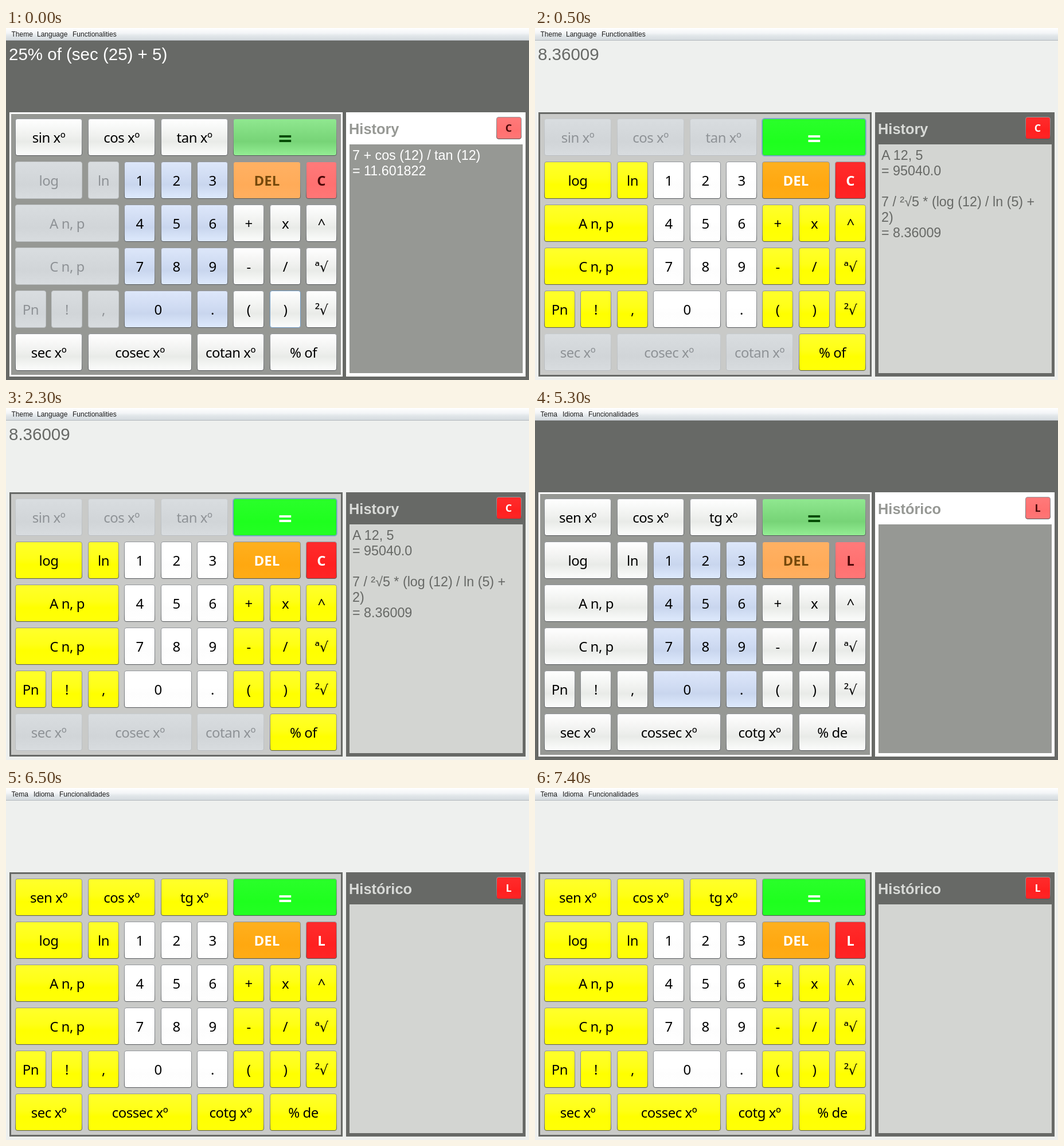
Write an HTML page that moves like this. It is 912x614 px and loops after 8000 ms.

```html
<!DOCTYPE html>
<html lang="en">
<head>
<meta charset="utf-8">
<title>Scientific calculator</title>
<style>
  html, body { margin: 0; width: 100%; height: 100%; overflow: hidden; }
  svg { position: absolute; left: 0; top: 0; width: 912px; height: 614px; display: block; }
  text { white-space: pre; }
  .menu { font: 12px "Liberation Sans", Arial, sans-serif; fill: #1c1c1c; }
  .display { font: 29.5px "Liberation Sans", Arial, sans-serif; }
  .log { font: 23.3px "Liberation Sans", Arial, sans-serif; }
  .title { font: bold 25.4px "Liberation Sans", Arial, sans-serif; }
  .key { font: 24px "Noto Sans", "DejaVu Sans", sans-serif; letter-spacing: -.5px; text-anchor: middle; }
  .bold { font-weight: bold; letter-spacing: 0; }
  .small { font-size: 18px; }
  .equals { font: bold 33px "DejaVu Sans", sans-serif; }

  /* Scenes are stacked, earliest on top; each one drops out when its time is over. */
  .scene { animation: 8s step-end infinite; }
  .s0 { animation-name: first; }
  .s1 { animation-name: second; }
  .s2 { animation-name: third; }
  @keyframes first { 0% { visibility: visible; } 6.25% { visibility: hidden; } }
  @keyframes second { 0% { visibility: visible; } 43.75% { visibility: hidden; } }
  @keyframes third { 0% { visibility: visible; } 81.25% { visibility: hidden; } }
</style>
</head>
<body>
<svg id="stage" viewBox="0 0 912 614" xmlns="http://www.w3.org/2000/svg"></svg>
<script>
const themes = {
  dark: {
    bg: '#676966', frame: '#ffffff', panel: '#969894', list: '#969894',
    ink: '#ffffff', title: '#969894', logInk: '#ffffff',
    fills: {
      op: ['#ffffff', '#f0f1ef', '#e9ebe8', '#fcfdfc'],
      num: ['#dde7fa', '#cfdbf2', '#c9d6ee', '#deeafd'],
      eq: ['#90e890', '#7dd97d', '#77d477', '#94ee94'],
      del: ['#ffb163', '#ffad5c', '#ffab58', '#ffaf60'],
      clear: ['#ff7a7a', '#ff7373', '#ff7070', '#ff7777']
    },
    labels: { op: '#000', num: '#000', eq: '#044a04', del: '#75490c', clear: '#4c0808' }
  },
  light: {
    bg: '#eef0ee', frame: '#676966', panel: '#c9cac8', list: '#d3d5d2',
    ink: '#676966', title: '#d8dad7', logInk: '#676966',
    fills: {
      op: ['#ffff2c', '#ffff16', '#ffff00', '#ffff08'],
      num: ['#ffffff', '#ffffff', '#fdfdfd', '#ffffff'],
      eq: ['#2aff2a', '#22ff22', '#1eff1e', '#24ff24'],
      del: ['#ffb01e', '#ffaa14', '#ffa810', '#ffac16'],
      clear: ['#ff2c2c', '#ff2424', '#ff2020', '#ff2626']
    },
    labels: { op: '#000', num: '#000', eq: '#fff', del: '#fff', clear: '#fff' }
  }
};

const words = {
  en: {
    menu: [[9.5, 'Theme'], [54, 'Language'], [116, 'Functionalities']], history: 'History', clear: 'C',
    sin: 'sin', tan: 'tan', cosec: 'cosec', cotan: 'cotan', of: '% of'
  },
  pt: {
    menu: [[9.5, 'Tema'], [48, 'Idioma'], [93, 'Funcionalidades']], history: 'Histórico', clear: 'L',
    sin: 'sen', tan: 'tg', cosec: 'cossec', cotan: 'cotg', of: '% de'
  }
};

// Each key is [label, column span, kind, group]; rows fill nine columns.
const keyRows = w => [
  [[w.sin + ' xº', 2, 'op', 'trig'], ['cos xº', 2, 'op', 'trig'], [w.tan + ' xº', 2, 'op', 'trig'], ['=', 3, 'eq']],
  [['log', 2, 'op', 'comb'], ['ln', 1, 'op', 'comb'], ...digits('123'), ['DEL', 2, 'del'], [w.clear, 1, 'clear']],
  [['A n, p', 3, 'op', 'comb'], ...digits('456'), ...ops('+', 'x', '^')],
  [['C n, p', 3, 'op', 'comb'], ...digits('789'), ...ops('-', '/', 'ª√')],
  [...ops('Pn', '!', ',').map(k => [...k, 'comb']), ['0', 2, 'num'], ['.', 1, 'num'], ...ops('(', ')', '²√')],
  [['sec xº', 2, 'op', 'trig'], [w.cosec + ' xº', 3, 'op', 'trig'], [w.cotan + ' xº', 2, 'op', 'trig'], [w.of, 2, 'op']]
];
const digits = s => [...s].map(d => [d, 1, 'num']);
const ops = (...labels) => labels.map(l => [l, 1, 'op']);

const scenes = [
  { theme: 'dark', lang: 'en', off: 'comb', focus: ')', display: '25% of (sec (25) + 5)',
    log: ['7 + cos (12) / tan (12)', '= 11.601822'] },
  { theme: 'light', lang: 'en', off: 'trig', focus: '=', display: '8.36009',
    log: ['A 12, 5', '= 95040.0', '', '7 / ²√5 * (log (12) / ln (5) +', '2)', '= 8.36009'] },
  { theme: 'dark', lang: 'pt', display: '', log: [] },
  { theme: 'light', lang: 'pt', display: '', log: [] }
];

const rect = (x, y, w, h, fill, extra = '') =>
  `<rect x="${x}" y="${y}" width="${w}" height="${h}" fill="${fill}" ${extra}/>`;
const text = (x, y, cls, s, fill = '') =>
  `<text x="${x}" y="${y}" class="${cls}" ${fill && `fill="${fill}"`}>${s}</text>`;
const gradient = (id, colors, stops) =>
  `<linearGradient id="${id}" x2="0" y2="1">` +
  colors.map((c, i) => `<stop offset="${stops[i]}" stop-color="${c}"/>`).join('') + '</linearGradient>';

function button(x, y, w, h, fill, stroke) {
  return rect(x + .5, y + .5, w - 1, h - 1, fill, `rx="3.5" stroke="${stroke}"`);
}

function key(scene, x, y, w, [label, , kind, group]) {
  const off = group && group === scene.off;
  const focused = label === scene.focus;
  const fill = off ? 'url(#off)' : `url(#${scene.theme}-${kind})`;
  const stroke = off ? 'url(#offEdge)' : focused ? '#6f9ac4' : 'url(#edge)';
  const ink = off ? '#8e9296' : themes[scene.theme].labels[kind];
  const cls = kind === 'eq' ? 'key equals' : kind === 'del' || kind === 'clear' ? 'key bold' : 'key';
  const glow = focused && kind === 'eq'
    ? rect(x - .5, y - .5, w + 1, 66, 'none', 'rx="4.5" stroke="#73a4d1" stroke-opacity=".7"') : '';
  return glow + button(x, y, w, 65, fill, stroke) +
    text(x + w / 2, y + (kind === 'eq' ? 46 : 42), cls, label, ink);
}

function keypad(scene) {
  const edge = col => 16 + 63.4 * col;
  return keyRows(words[scene.lang]).map((row, r) => {
    let col = 0;
    return row.map(k => {
      const x = Math.round(edge(col));
      col += k[1];
      return key(scene, x, 158 + 75 * r, Math.round(edge(col) - 9.4) - x, k);
    }).join('');
  }).join('');
}

function draw(scene, i) {
  const t = themes[scene.theme], w = words[scene.lang];
  return `<g class="scene s${i}">` +
    rect(0, 0, 912, 614, t.bg) +
    rect(0, 0, 912, 22, 'url(#bar)') + rect(0, 21, 912, 1, '#b3b8bc') +
    w.menu.map(([x, s]) => text(x, 15, 'menu', s)).join('') +
    text(5, 56, 'display', scene.display, t.ink) +
    rect(6, 147, 581, 461, t.frame) + rect(9, 150, 575, 455, t.panel) +
    keypad(scene) +
    rect(593, 147, 313, 461, t.frame) + rect(599, 203, 302, 399, t.list) +
    text(598, 185, 'title', w.history, t.title) +
    button(855, 155, 44, 39, `url(#${scene.theme}-clear)`, 'url(#edge)') +
    text(876.5, 181, 'key bold small', w.clear, t.labels.clear) +
    scene.log.map((s, n) => text(604, 230 + 27 * n, 'log', s, t.logInk)).join('') +
    '</g>';
}

const defs = Object.entries(themes).map(([name, t]) =>
  Object.entries(t.fills).map(([kind, c]) => gradient(`${name}-${kind}`, c, [0, .45, .62, 1])).join('')
).join('') +
  gradient('bar', ['#ffffff', '#f3f5f7', '#e2e7ea', '#d3d9dd'], [0, .4, .6, 1]) +
  gradient('edge', ['#92959a', '#7a7d80', '#54575a'], [0, .8, 1]) +
  gradient('off', ['#d9dde0', '#d3d7da', '#d1d5d8', '#d8dcdf'], [0, .45, .62, 1]) +
  gradient('offEdge', ['#c6cacd', '#b9bdc0'], [0, 1]);

document.getElementById('stage').innerHTML =
  `<defs>${defs}</defs>` + scenes.map(draw).reverse().join('');
</script>
</body>
</html>
```
